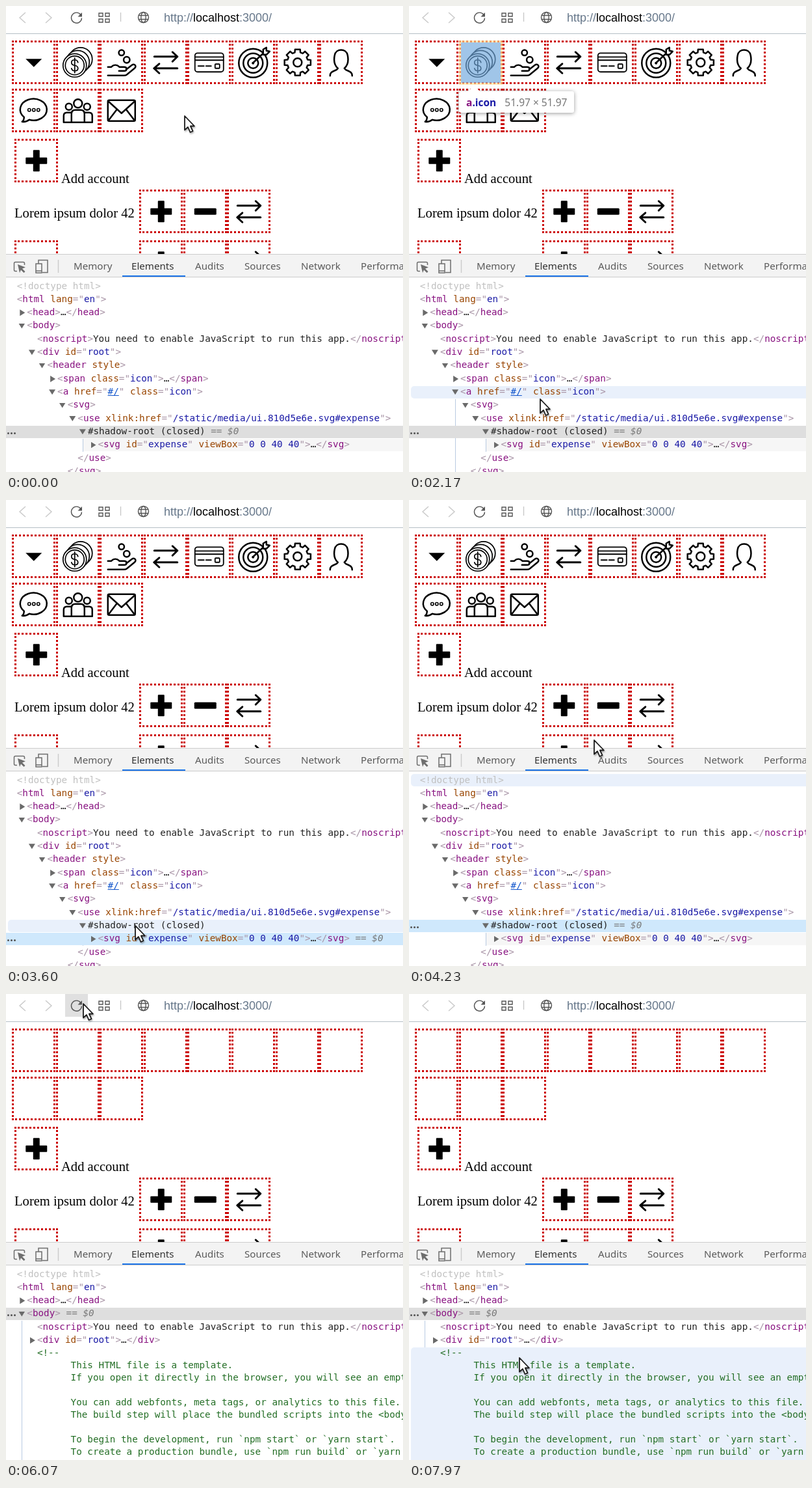
Animation, 611 px wide and 716 px high, one loop 8000 ms. Source, as an HTML page:

```html
<!DOCTYPE html>
<html lang="en">
<head>
<meta charset="utf-8">
<style>
html, body { margin: 0; width: 100%; height: 100%; overflow: hidden; background: #fff; }
#stage { position: absolute; left: 0; top: 0; width: 611px; height: 716px; overflow: hidden; background: #fff; }
#stage div, #stage svg, #stage p, #stage i { position: absolute; margin: 0; white-space: pre; }
#bar { left: 0; top: 0; width: 611px; height: 42px; border-bottom: 1px solid #b5bec5; }
#bar svg, #tabs svg { left: 0; top: 0; }
#url { left: 243px; top: 7px; font: 18px/22px "Liberation Sans", sans-serif; color: #66778a; }
#url b { font-weight: 400; color: #000; }
.cell { width: 67px; height: 67px; box-sizing: border-box; border: 3px dotted #c00; }
.cell svg { left: -3px; top: -3px; width: 67.56px; height: 67.56px; fill: none; stroke: #000; stroke-width: 2.5; stroke-linejoin: round; stroke-linecap: round; }
.cell .solid { fill: #000; stroke: none; }
.cell .blank { fill: #fff; }
.cell .bold { stroke-width: 3; }
.serif { font: 20.6px/24px "Liberation Serif", serif; color: #000; }
#status { left: -1px; top: 354px; width: 139px; height: 28px; box-sizing: border-box; border: 1px solid #c4c4c4; border-radius: 0 4px 0 0; background: #f5f5f5; padding-left: 8px; font: 16px/25px "Liberation Sans", sans-serif; color: #666; }
.shade { box-sizing: border-box; background: rgba(111,168,220,.66); background-clip: padding-box; border: 0 solid rgba(255,229,153,.66); }
#tip { left: 77px; top: 131px; height: 33px; padding: 0 11px; border-radius: 3px; background: #fff; box-shadow: 0 1px 6px rgba(0,0,0,.4); font: 15.5px/34px "Noto Sans", sans-serif; color: #777; }
#tip::before { content: ""; position: absolute; left: 14px; top: -9px; border: 9px solid transparent; border-top: 0; border-bottom-color: #fff; }
#tip b { color: #1a1aa6; margin-right: 13px; }
#tip em { font-style: normal; color: #881280; }
#tools { left: 0; top: 381px; width: 611px; height: 335px; background: #fff; }
#tabs { left: 0; top: 0; width: 611px; height: 34px; background: #f3f3f3; border: solid #ccc; border-width: 1px 0; font: 15.1px/35px "Ubuntu", "Noto Sans", sans-serif; color: #5a5a5a; }
#tabs div { top: 0; }
#tabs .on { color: #333; }
#tabs i { left: 179px; top: 32px; width: 97px; height: 2px; background: #1a73e8; }
#tree { left: 0; top: 0; font: 14.3px/19px "DejaVu Sans Mono", monospace; color: #222; }
.row { left: 0; width: 611px; height: 19px; }
.row p { top: -.6px; }
.row.kid { background: linear-gradient(90deg, transparent 119px, #f6f6f6 119px); }
.row.hover::before { content: ""; position: absolute; left: 3px; right: 0; top: 0; bottom: 0; border-radius: 5px 0 0 5px; background: #e9f0fb; }
.row.sel { background: #dedede; }
.row.sel.focus { background: #cfe8fc; }
.row .dots { display: none; left: 2px; top: 10px; width: 3px; height: 3px; border-radius: 50%; background: #555; box-shadow: 5px 0 #555, 10px 0 #555; }
.row .eq { display: none; font-style: italic; color: #777; }
.row .guide { display: none; top: 20px; width: 1px; background: #b9cbe2; }
.row.sel .eq { display: inline; }
.row.sel .dots, .row.sel .guide, .row.hover .guide { display: block; }
.arrow { background: #6a6a6a; }
.open { width: 10px; height: 8px; top: 5.5px; clip-path: polygon(0 0, 100% 0, 50% 100%); }
.shut { width: 8px; height: 10px; top: 4.5px; clip-path: polygon(0 0, 100% 50%, 0 100%); }
.b { color: #a894a6; } .t { color: #881280; } .n { color: #994500; } .v { color: #1a1aa6; }
.v u { color: #1155cc; } .c { color: #236e25; } .d { color: #c0c0c0; }
#cursor { overflow: visible; filter: drop-shadow(1px 2px 1px rgba(0,0,0,.3)); }
</style>
</head>
<body>
<div id="stage">
  <div id="page"></div>
  <div id="status">localhost:3000/#/</div>
  <div id="shade" class="shade"></div>
  <div id="tip"></div>
  <div id="bar">
    <svg width="240" height="42" fill="none" stroke="#555" stroke-width="1.4">
      <rect id="press" x="91" y="0" width="35" height="35" fill="#e0e0e0" stroke="none"/>
      <path stroke="#c9c9c9" d="M30 10l-9 8 9 8M61 10l9 8-9 8M176.500 10v14"/>
      <g id="reload"><path d="M115 13.500a8 8 0 1 0 1.500 5"/><path d="M117 10v6.500h-6.500z" fill="#555" stroke="none"/></g>
      <path id="cancel" d="M101 10.500l15 15M116 10.500l-15 15"/>
      <path d="M143 11h6v5h-6zM153 11h6v5h-6zM143 20h6v5h-6zM153 20h6v5h-6z"/>
      <circle cx="211.500" cy="17.500" r="8"/><ellipse cx="211.500" cy="17.500" rx="3.700" ry="8"/>
      <path d="M204 14.500h15M204 20.500h15"/>
    </svg>
    <div id="url">http://<b>localhost</b>:3000/</div>
  </div>
  <div id="tools">
    <div id="tabs">
      <svg width="90" height="34" fill="none" stroke="#6e6e6e" stroke-width="1.500">
        <path d="M17 25.500h-2.500a2 2 0 0 1-2-2v-10a2 2 0 0 1 2-2h12a2 2 0 0 1 2 2v2.500"/>
        <path d="M18 15l12 4.500-5 2 4.500 4.500-2 2-4.500-4.500-2 4.500z" fill="#6e6e6e" stroke="none"/>
        <path d="M50 14V8.500h14v19h-8M46 14h9v14h-9zM46 25h9"/><path stroke="#ccc" d="M80.500 8v20"/>
      </svg><i></i>
    </div>
    <div id="tree"></div>
  </div>
  <svg id="cursor" width="1" height="1" fill="#fff" stroke="#1c1c1c" stroke-width="1.800" stroke-linejoin="round">
    <path id="pointer" d="M1 1v21.500l5-4.500 3.500 8 4-1.800-3.600-7.700h6z"/>
    <path id="hand" d="M-2 12V2q0-2 2-2t2 2v6q2-1 4 1 2-1 4 1 3-1 5 2v5l-2 5H0l-5-7q-3-3-1-4 1-1 4 2zM2 8v4M6 9v4M10 10v4"/>
  </svg>
</div>
<script>
const $ = id => document.getElementById(id);
const LOOP = 8000, ROW = 20.33, FIRST_ROW = 421.1, PITCH = 67.56;

// --- page ---
const circle = (x, y, r, cls = '') => `<circle cx="${x}" cy="${y}" r="${r}" class="${cls}"/>`;
const path = (d, cls = '') => `<path d="${d}" class="${cls}"/>`;
const gear = () => {
  const points = [];
  for (let i = 0; i < 8; i++)
    for (const [turn, r] of [[-.27, 16], [-.19, 20.5], [.19, 20.5], [.27, 16]]) {
      const a = i * Math.PI / 4 + turn;
      points.push((r * Math.cos(a)).toFixed(1) + ' ' + (r * Math.sin(a)).toFixed(1));
    }
  return path('M' + points.join('L') + 'z') + circle(0, 0, 6.5);
};
const icons = {
  caret: path('M-12.5 -5.5H12.5L0 7z', 'solid'),
  coins: `<g stroke-width="1.7">${[[4, -5], [-.5, -.5], [-5, 4.5]].map(([x, y]) => circle(x, y, 18, 'blank')).join('')}${circle(-5, 4.5, 14.5)}${path('M0 0q-1-4-5-4-5 0-5 4 0 4 5 4.500 5 1 5 4.500 0 4-5 4-4 0-5-4M-5-7V16')}</g>`,
  give: circle(0, -15, 4.2) + circle(8, -4, 4.7) + path('M-21 7H-16C-12 3-7 3-3 7H4C9 7 9 13 4 13H-4M7 11L16 4C20 1 24 6 20 9L9 18Q7 20 4 20H-21'),
  swap: path('M-17.500-9H18M10.500-16L18-9 10.500-1.500M18 9H-17.500M-10 2l-8 7 8 7.500', 'bold'),
  card: `<g stroke-width="1.8"><rect x="-22" y="-14.5" width="44" height="29" rx="4"/>${path('M-22-8.500H22M-22-3.500H22M-17 5.500H-8M-5 5.500H3')}<rect x="9" y="2.500" width="7" height="6.500" rx="1"/></g>`,
  target: circle(-.5, 1, 22) + circle(-.5, 1, 15) + circle(-.5, 1, 8) + path('M-1 1L15-14V-20L20-23 20-18 25-17 20-12H15', 'blank') + circle(-.5, 1, 2, 'solid'),
  gear: gear(),
  person: path('M-17 20.500C-17 12-8 14-5 9-12 3-11-6-10-11-8-22 8-22 10-11 11-6 12 3 5 9 8 14 17 12 17 20.500'),
  chat: path('M-15 10A20.500 16.500 0 1 1-7 14Q-12 18-18 17-15 15-15 10z') + [-7, 0, 7].map(x => `<g stroke-width="1.6">${circle(x, -1, 2.2)}</g>`).join(''),
  people: circle(0, -11, 6.5) + circle(-14, -6, 5) + circle(14, -6, 5) + path('M-10 18V5Q-10-1-4-1H4Q10-1 10 5V18zM-10 18H-22V8Q-22 3-17 3H-11M10 18H22V8Q22 3 17 3H11'),
  mail: '<rect x="-21" y="-16" width="42" height="32" rx="2"/>' + path('M-20-14L0 4 20-14M-20 15L-7-2M20 15L7-2'),
  plus: path('M-5-15.500q0-1 1-1H4q1 0 1 1V-5H15.500q1 0 1 1V4q0 1-1 1H5V15.500q0 1-1 1H-4q-1 0-1-1V5H-15.500q-1 0-1-1V-4q0-1 1-1H-5z', 'solid'),
  minus: '<rect x="-17" y="-5" width="34" height="10" rx="1.5" class="solid"/>',
  none: ''
};
const cells = (left, top, names, cls = '') => names.split(' ').map((name, i) =>
  `<div class="cell" style="left:${left + i * PITCH}px;top:${top}px"><svg class="${cls}" viewBox="-33.78 -33.78 67.56 67.56">${icons[name]}</svg></div>`).join('');
const label = (left, top, text) => `<div class="serif" style="left:${left}px;top:${top}px">${text}</div>`;

$('page').innerHTML =
  cells(9.2, 53.3, 'caret coins give swap card target gear person', 'nav') +
  cells(9.2, 127.3, 'chat people mail', 'nav') +
  cells(13, 204, 'plus') + label(85, 253, 'Add account') +
  label(13, 306, 'Lorem ipsum dolor 42') + cells(205, 282, 'plus minus swap') +
  cells(13, 360, 'none') + cells(205, 360, 'plus minus swap');
const navIcons = document.querySelectorAll('.nav');

// --- developer tools ---
[[104, 'Memory'], [193, 'Elements'], [291, 'Audits'], [367, 'Sources'], [454, 'Network'], [546, 'Performance']].forEach(([x, name]) =>
  $('tabs').insertAdjacentHTML('beforeend', `<div class="${name === 'Elements' ? 'on' : ''}" style="left:${x}px">${name}</div>`));

const ink = (cls, text) => `<span class="${cls}">${text}</span>`;
const tag = (name, ...attrs) => ink('b', '&lt;') + ink('t', name) + attrs.map(attr => {
  const [key, value] = attr.split('=');
  return ' ' + ink('n', key) + (value ? ink('b', '="') + ink('v', value) + ink('b', '"') : '');
}).join('') + ink('b', '&gt;');
const close = name => ink('b', '&lt;/') + ink('t', name) + ink('b', '&gt;');
const folded = (name, ...attrs) => tag(name, ...attrs) + '…' + close(name);

// Each row: indent level, arrow, markup, index of the row that ends its children
const head = [
  [0, '', ink('d', '&lt;!doctype html&gt;')],
  [0, '', tag('html', 'lang=en').replace('class="t"', 'class="t flash"')],
  [1, 'shut', folded('head')],
  [1, 'open', tag('body'), 15],
  [2, '', tag('noscript') + 'You need to enable JavaScript to run this app.' + close('noscript')]
];
const expanded = [...head,
  [2, 'open', tag('div', 'id=root'), 15],
  [3, 'open', tag('header', 'style'), 15],
  [4, 'shut', folded('span', 'class=icon')],
  [4, 'open', tag('a', 'href=<u>#/</u>', 'class=icon'), 15],
  [5, 'open', tag('svg'), 14],
  [6, 'open', tag('use', 'xlink:href=/static/media/ui.810d5e6e.svg#expense'), 13],
  [7, 'open', '#shadow-root (closed)', 13],
  [8, 'shut', folded('svg', 'id=expense', 'viewBox=0 0 40 40')],
  [6, '', close('use')],
  [5, '', close('svg')]
];
const comment = ['&lt;!--', 'This HTML file is a template.',
  'If you open it directly in the browser, you will see an empty page.', '',
  'You can add webfonts, meta tags, or analytics to this file.',
  'The build step will place the bundled scripts into the &lt;body&gt; tag.', '',
  'To begin the development, run `npm start` or `yarn start`.',
  'To create a production bundle, use `npm run build` or `yarn build`.'].join('\n      ');
const reloaded = [...head, [2, 'shut', folded('div', 'id=root')], [2, '', ink('c', comment)]];

const buildTree = rows => {
  const box = document.createElement('div');
  box.innerHTML = rows.map(([level, arrow, html, end], i) => {
    const x = 16.7 + 15.6 * level;
    const tall = html.includes('&lt;!--') ? 'height:180px;' : '';
    const guide = end ? `<div class="guide" style="left:${x - 8}px;height:${(end - i - 1) * ROW}px"></div>` : '';
    const mark = arrow ? `<div class="arrow ${arrow}" style="left:${x - (arrow === 'open' ? 13 : 11)}px"></div>` : '';
    return `<div class="row ${level === 8 ? 'kid' : ''}" style="${tall}top:${FIRST_ROW - 381 + ROW * i}px">` +
      `<i class="dots"></i>${guide}${mark}<p style="left:${x}px">${html}<span class="eq"> == $0</span></p></div>`;
  }).join('');
  $('tree').append(box);
  return { box, rows: [...box.querySelectorAll('.row')] };
};
const before = buildTree(expanded), after = buildTree(reloaded);
const flash = after.box.querySelector('.flash');

// --- timeline: time, cursor x, cursor y, optional forced hover row ---
const moves = [
  [0, 274, 168], [900, 104, 66], [2170, 201, 603], [2230, 205, 688], [2330, 203, 640], [2430, 200, 650],
  [2630, 200, 630], [2700, 202, 658], [2800, 203, 668], [3400, 201, 664], [3500, 199, 657], [3600, 198, 653],
  [3900, 196, 690], [4000, 215, 600], [4100, 240, 480], [4230, 284, 368, 0], [4330, 255, 210], [4430, 208, 45],
  [4630, 152, 60], [4800, 122, 40], [5030, 120, 22], [5130, 116, 16], [5400, 114, 18], [6070, 118, 14],
  [6170, 140, 12], [6330, 216, 200], [6470, 292, 190], [6570, 275, 165], [6670, 250, 140], [6830, 225, 135],
  [6930, 170, 84], [7030, 200, 230], [7130, 215, 390], [7470, 200, 532], [7630, 185, 508], [7730, 188, 540],
  [7830, 194, 592], [7970, 169, 558]
];
const show = (el, on) => { el.style.display = on ? '' : 'none'; };
const place = (el, x, y, size, border) =>
  Object.assign(el.style, { left: x + 'px', top: y + 'px', width: size + 'px', height: size + 'px', borderWidth: border + 'px' });
const bend = (a, b, c, p) => (1 - p) * (1 - p) * a + 2 * p * (1 - p) * b + p * p * c;

function render(t) {
  let [, x, y, forced] = moves.findLast(move => move[0] <= t);
  if (t > 170 && t < 900) {
    const p = (t - 170) / 730, eased = p * p * (3 - 2 * p);
    x = bend(274, 215, 104, eased);
    y = bend(168, 72, 66, eased);
  }
  const isBefore = t < 5400, isAfter = t >= 5970, tree = isBefore ? before : after;
  const overLink = (y > 53 && y < 121 && x > 77 && x < 550) || (y > 127 && y < 194 && x > 9 && x < 212);
  const hover = forced ?? (y < FIRST_ROW ? -1 : Math.min(tree.rows.length - 1, Math.floor((y - FIRST_ROW) / ROW)));
  const selected = !isBefore ? 3 : t >= 3270 && t < 3800 ? 12 : 11;

  show(before.box, isBefore);
  show(after.box, isAfter);
  tree.rows.forEach((row, i) => {
    row.classList.toggle('hover', i === hover && i !== selected);
    row.classList.toggle('sel', i === selected);
    row.classList.toggle('focus', isBefore && t >= 3270);
  });

  const fade = t < 6330 ? 0 : Math.max(0, 1 - (t - 6330) / 800);
  flash.style.background = `rgba(136,18,128,${fade * .75})`;
  flash.style.color = `rgb(${136 + 119 * fade},${18 + 237 * fade},${128 + 127 * fade})`;

  const onLink = isBefore && hover === 8, onSvg = isBefore && [9, 10, 12].includes(hover);
  show($('shade'), onLink || onSvg);
  show($('tip'), onLink || onSvg);
  if (onLink) place($('shade'), 76.8, 53.3, 67.56, 3);
  if (onSvg) place($('shade'), 85, 63, 52, 0);
  const tip = onLink ? '<b><em>a</em>.icon</b>51.97 × 51.97' : '<b><em>svg</em></b>40 × 40';
  if ($('tip').innerHTML !== tip) $('tip').innerHTML = tip;

  navIcons.forEach(icon => show(icon, t < 5770));
  const loading = t >= 5330 && t < 6070;
  show($('reload'), !loading);
  show($('cancel'), loading);
  show($('press'), y < 36 && x > 91 && x < 126);
  $('status').style.opacity = !overLink ? 0 : t >= 6930 ? .3 : 1;

  show($('pointer'), !overLink);
  show($('hand'), overLink);
  $('cursor').style.left = x + 'px';
  $('cursor').style.top = y + 'px';
}

const start = performance.now();
(function frame() {
  render((performance.now() - start) % LOOP);
  requestAnimationFrame(frame);
})();
</script>
</body>
</html>
```
